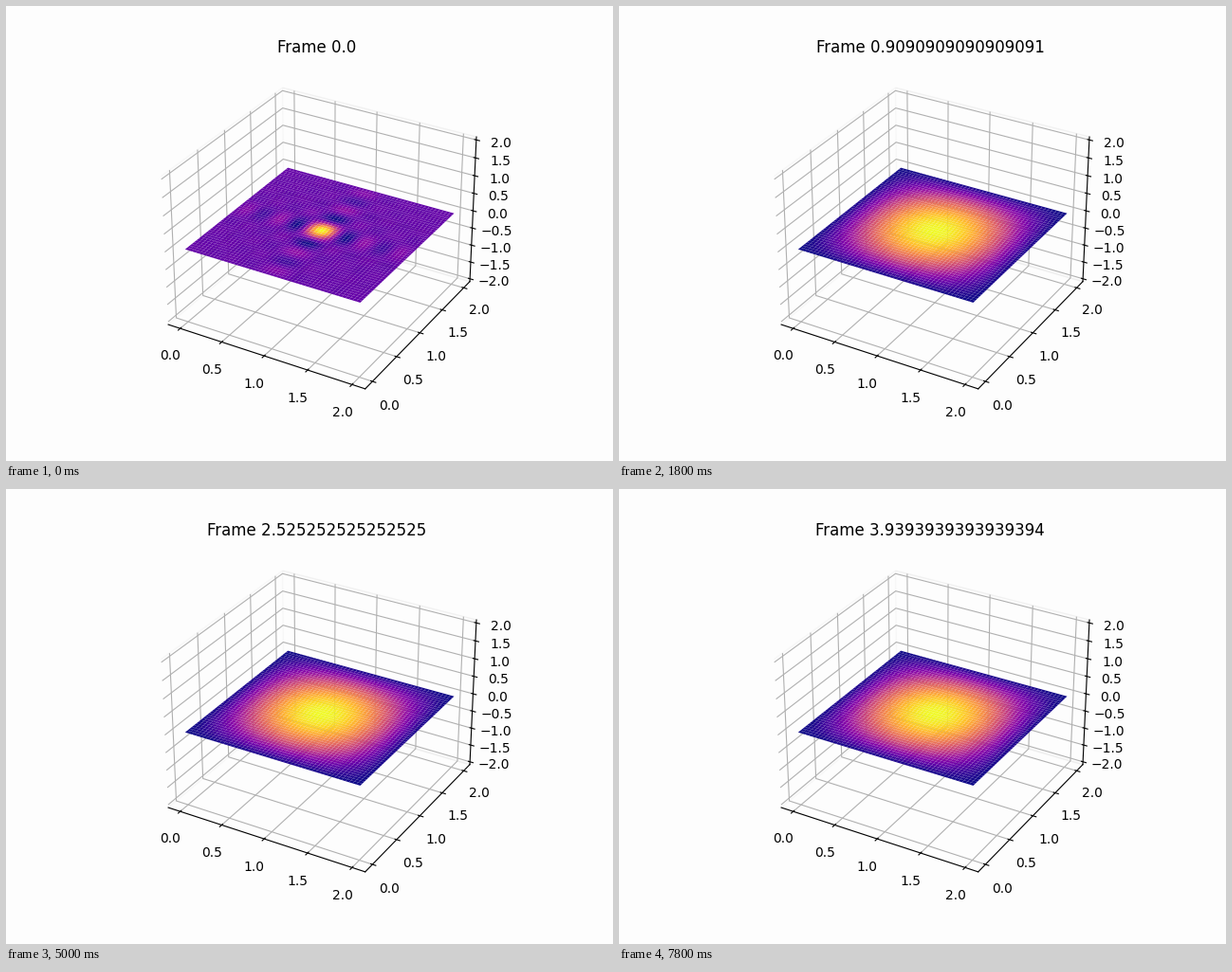
A matplotlib script for the animation above (8 s loop, 640 by 480 pixels).

```python
import numpy as np
import matplotlib.pyplot as plt
from matplotlib.animation import FuncAnimation

SIDE = 2.0
DIFFUSIVITY = 0.5
HEAT = 0.0006
MODES = range(1, 10, 2)
FRAMES = 40
BACKGROUND = "#fdfdfd"

times = np.linspace(0, 10, 100)
axis = np.linspace(0, SIDE, 50)
X, Y = np.meshgrid(axis, axis)


def profile(t):
    """One-dimensional sine series of a point source at the middle, at time t."""
    total = np.zeros_like(axis)
    for n in MODES:
        k = n * np.pi / SIDE
        total += np.sin(k * SIDE / 2) * np.sin(k * axis) * np.exp(-DIFFUSIVITY * k * k * t)
    return total


def temperature(t):
    p = profile(t)
    return HEAT * np.outer(p, p)


fig = plt.figure(figsize=(6.4, 4.8), dpi=100, facecolor=BACKGROUND)
ax = fig.add_subplot(projection="3d", facecolor=BACKGROUND)

pad = 0.1 + (SIDE + 0.2) / 48
ax.set_xlim(-pad, SIDE + pad, view_margin=0)
ax.set_ylim(-pad, SIDE + pad, view_margin=0)
ax.set_zlim(-2 * 25 / 24, 2 * 25 / 24, view_margin=0)
for a in (ax.xaxis, ax.yaxis, ax.zaxis):
    a.pane.set_facecolor("none")

title = ax.set_title("")
surfaces = []


def draw(i):
    while surfaces:
        surfaces.pop().remove()
    t = times[i]
    surfaces.append(ax.plot_surface(X, Y, temperature(t), cmap="plasma"))
    title.set_text(f"Frame {t}")
    return surfaces + [title]


anim = FuncAnimation(fig, draw, frames=FRAMES, interval=200, repeat=True, repeat_delay=0)
plt.show()
```
